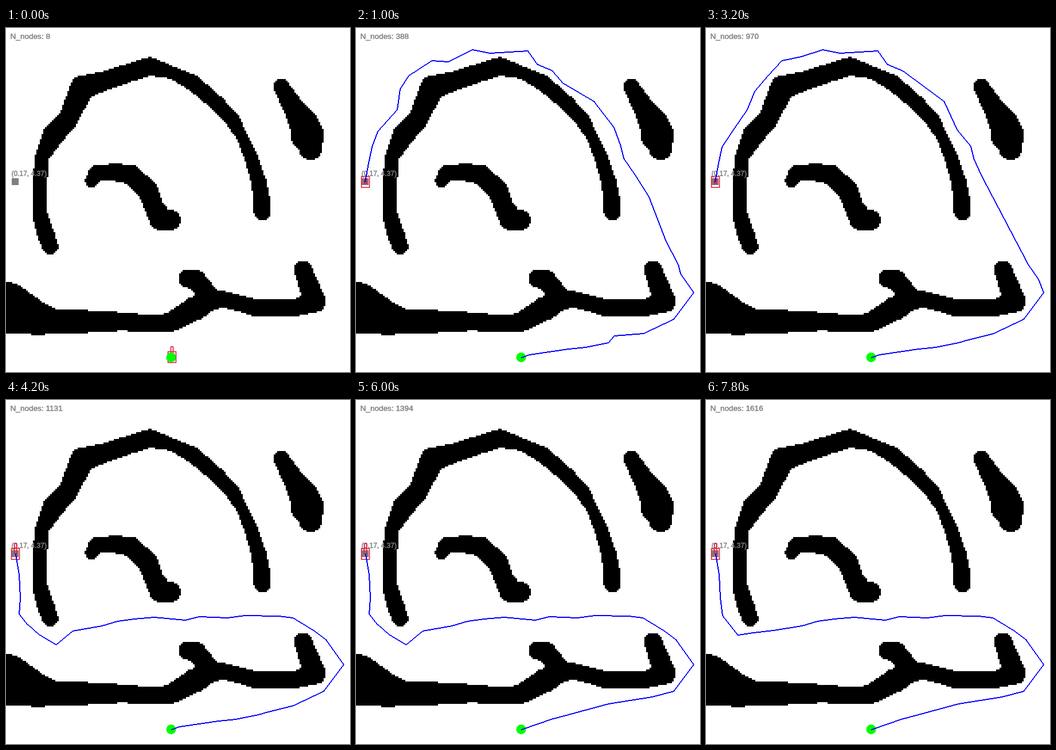
Animation of 600 by 600 pixels, one loop 8000 ms. Source, as an HTML page with a canvas:

```html
<!DOCTYPE html>
<html lang="en">
<head>
<meta charset="utf-8">
<title>Path planner</title>
<style>
  html, body { margin: 0; width: 100%; height: 100%; overflow: hidden; background: #fff; }
  canvas { display: block; width: 600px; height: 600px; }
</style>
</head>
<body>
<canvas id="stage" width="600" height="600"></canvas>
<script>
const ctx = document.getElementById('stage').getContext('2d');
const LOOP = 8000, STEP = 200, CELL = 3;
const FONT = '"Liberation Sans", Arial, sans-serif';

const points = text => text.trim().split(/\s+/).map(point => point.split(',').map(Number));
const mix = (a, b, k) => a + (b - a) * k;

// Brush strokes through a few key points: x, y, brush radius.
const strokes = [
  `77,381,14 69,358,15 59,325,13 59,265,13 63,225,12 82,188,19 108,160,17 133,104,21
   170,93,17 215,78,16 251,67,16 290,78,11 325,95,14 368,131,13 395,160,13 412,190,10
   429,230,12 441,268,13 446,300,15 447,320,15`,
  '149,267,11 158,253,14 188,252,15 217,255,17 247,283,18 258,311,17 270,333,20 287,335,18',
  '480,102,14 500,136,18 521,170,26 526,188,29 531,210,20',
  `5,490,46 60,508,28 88,512,21 160,512,19 200,512,16 265,516,14.5 290,512,17 330,489,21
   355,475,18 378,473,14 410,481,14 435,488,15 505,488,15 539,477,19 518,422,16`,
  '317,437,16 332,439,17 355,470,18'
].map(points);

function touches(x, y, [ax, ay, ar], [bx, by, br]) {
  const dx = bx - ax, dy = by - ay;
  const along = ((x - ax) * dx + (y - ay) * dy) / (dx * dx + dy * dy);
  const k = Math.min(1, Math.max(0, along));
  return Math.hypot(x - ax - dx * k, y - ay - dy * k) < mix(ar, br, k);
}

function buildMap() {
  const map = document.createElement('canvas');
  map.width = map.height = 600;
  const m = map.getContext('2d');
  const segments = strokes.flatMap(s => s.slice(1).map((end, i) => [s[i], end]));
  for (let y = -1; y < 600; y += CELL)
    for (let x = -1; x < 600; x += CELL)
      if (segments.some(([a, b]) => touches(x + CELL / 2, y + CELL / 2, a, b)))
        m.fillRect(x, y, CELL, CELL);
  return map;
}
const map = buildMap();

// Routes run from start to goal; slack and bulge (0 or 1) relax the parts not yet optimised.
const corner = points('554,508 589,461');
const lowBase = slack => [
  ...points('288,575 302,570 370,560 400,557 440,549'), [450, 546 - 9 * slack], [501, 533], ...corner
];
const highBase = [...points('288,575 340,557 370,549 440,530 516,518'), ...corner];

const over = (slack, bulge) => [
  ...lowBase(slack),
  [580 - 14 * slack, 438 - 10 * slack],
  [562 + 9 * (bulge - slack), 412], [541 + 13 * (bulge - slack), 372],
  [500 + 11 * bulge, 294], [480 + 7 * bulge, 256], [467, 227], [462, 206],
  [438 + 12 * bulge, 177 - 4 * bulge], [416, 129], [362, 89 + 8 * bulge],
  ...points('343,75 317,64 300,40 233,44 203,38'),
  [166 - 6 * slack, 50 + 9 * slack], [132, 57],
  [108 - 16 * slack, 83], [85 - 8 * slack, 110 - 4 * slack], [72, 142],
  [50 - 12 * slack, 174 + 6 * slack], ...points('28,207 22,235 16,268')
];

const wideHook = '116,403 87,427 57,409 38,392 23,373';
const tightHook = '117,402 82,406 56,410 29,376';
const under = (base, hook) => [
  ...base,
  ...points(`559,419 536,402 500,380 475,377 416,376 386,380 337,378 312,384
    258,379 223,382 194,386 167,394 ${hook} 25,345 23,305 17,268`)
];

const routes = [
  { at: 600, path: over(1, 1) },
  { at: 1600, path: over(0, 1) },
  { at: 2400, path: over(0, 0) },
  { at: 3400, path: under(lowBase(0), wideHook), up: true },
  { at: 4400, path: under(highBase, wideHook), up: true },
  { at: 7400, path: under(highBase, tightHook), up: true }
];

const counts = points('0,8 1000,388 1800,653 3200,970 5200,1291 6800,1497 7800,1616');

function nodeCount(t) {
  const i = Math.max(1, counts.findIndex(([time]) => time >= t));
  const [t0, n0] = counts[i - 1], [t1, n1] = counts[i];
  return Math.round(mix(n0, n1, (t - t0) / (t1 - t0)));
}

function label(text, x, y, size) {
  ctx.font = `${size}px ${FONT}`;
  ctx.fillStyle = ctx.strokeStyle = '#808080';
  ctx.lineWidth = 0.5;
  ctx.fillText(text, x, y);
  ctx.strokeText(text, x, y);
}

function robot(x, y, up) {
  ctx.lineWidth = 1.5;
  ctx.strokeStyle = '#e4102c';
  ctx.strokeRect(x - 7, y - 9.5, 14, 19);
  ctx.strokeRect(x - 2, up ? y - 18 : y - 5, 4, up ? 18 : 8);
}

// Hard-edged line, two pixels thick across its main direction.
function pixelLine([x0, y0], [x1, y1]) {
  const dx = x1 - x0, dy = y1 - y0;
  const steps = Math.max(Math.abs(dx), Math.abs(dy));
  const steep = Math.abs(dy) > Math.abs(dx);
  for (let i = 0; i <= steps; i++) {
    const x = Math.round(mix(x0, x1, i / steps)), y = Math.round(mix(y0, y1, i / steps));
    if (steep) ctx.fillRect(x - 1, y, 2, 1);
    else ctx.fillRect(x, y - 1, 1, 2);
  }
}

function draw(t) {
  const route = routes.filter(r => r.at <= t).pop();
  ctx.fillStyle = '#fff';
  ctx.fillRect(0, 0, 600, 600);
  ctx.drawImage(map, 0, 0);
  ctx.fillStyle = '#808080';
  ctx.fillRect(10, 262, 12, 12);
  label('(0.17, 4.37)', 9.5, 258, 12);
  label('N_nodes: ' + nodeCount(t), 7.5, 19, 13.6);
  if (route) robot(16.5, 268.5, route.up);
  else robot(289.5, 574, true);
  ctx.fillStyle = '#0f0';
  ctx.beginPath();
  ctx.arc(288, 574.5, 8.5, 0, 2 * Math.PI);
  ctx.fill();
  if (!route) return;
  ctx.fillStyle = '#00f';
  route.path.slice(1).forEach((end, i) => pixelLine(route.path[i], end));
}

const began = performance.now();
function tick() {
  const t = (performance.now() - began) % LOOP;
  draw(Math.floor(t / STEP) * STEP);
  requestAnimationFrame(tick);
}
tick();
</script>
</body>
</html>
```
